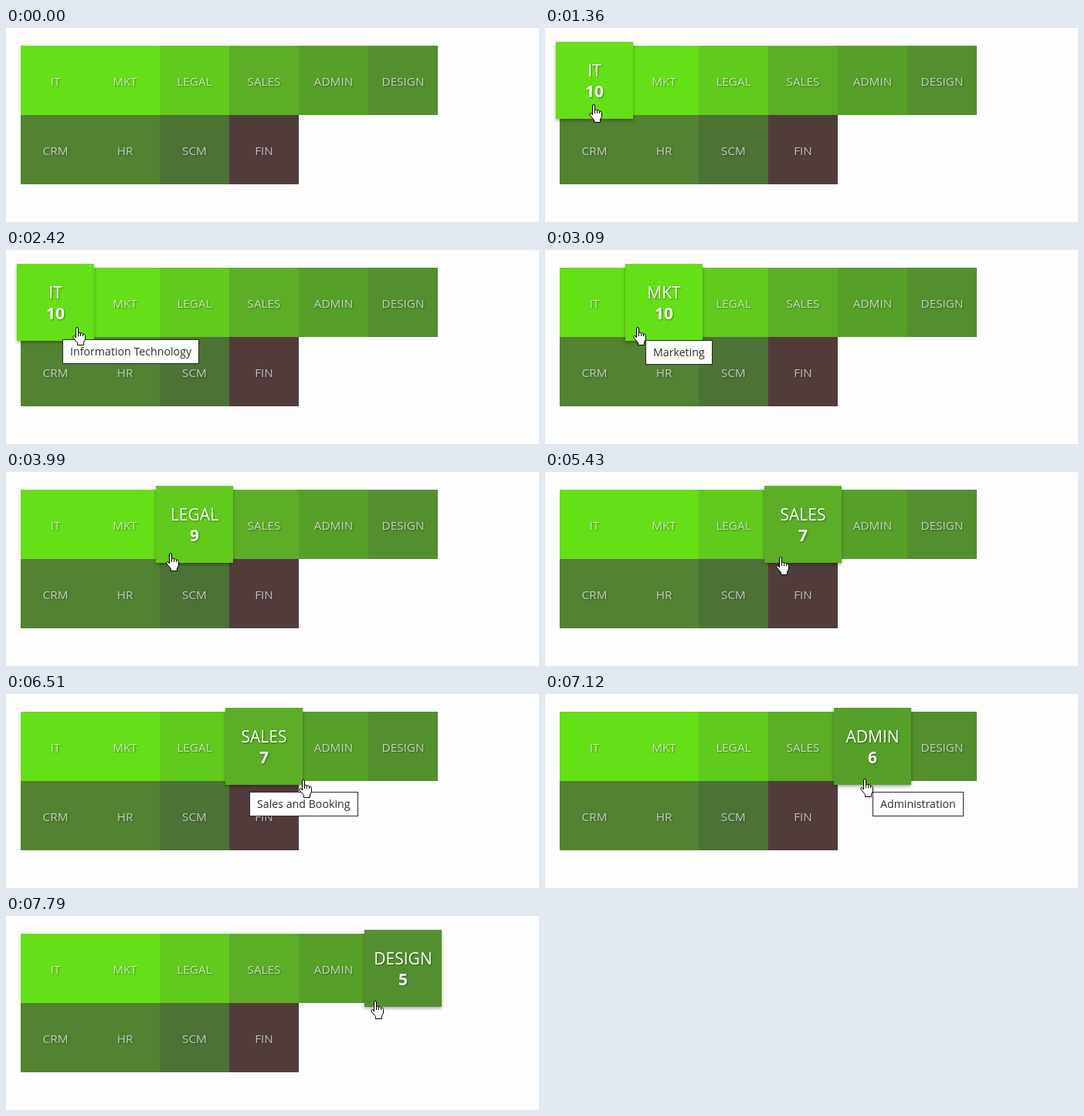
These frames come from a looping animation (690x252 px, 8 s). An HTML page:

```html
<!DOCTYPE html>
<html lang="en">
<head>
<meta charset="utf-8">
<title>Department tiles</title>
<style>
  html, body { margin: 0; width: 100%; height: 100%; overflow: hidden; }
  body { position: relative; background: linear-gradient(#fff 8px, #fdfdfd 8px); font-family: "Open Sans", "Noto Sans", sans-serif; }
  .tile { position: absolute; box-sizing: border-box; width: 90px; height: 90px; padding-top: 1px;
    font-size: 15.3px; line-height: 90px; text-align: center; white-space: nowrap;
    color: rgba(255, 255, 255, .7); text-shadow: 1px 1px 2px rgba(0, 0, 0, .4); }
  .tile b { display: none; }
  .tile.hover { width: 100px; height: 100px; margin: -5px; padding-top: 24px; z-index: 1;
    font-size: 21px; line-height: 27px; color: #fff; box-shadow: 0 2px 4px rgba(0, 0, 0, .35); }
  .tile.hover b { display: block; }
  #tip { position: absolute; z-index: 2; padding: 0 9px; border: 1px solid #2b2b2b; background: #fff;
    color: #2b2b2b; font-size: 14.2px; line-height: 30px; white-space: nowrap; }
  svg { position: absolute; left: 0; top: 0; z-index: 3; overflow: visible; fill: #fff; stroke: #000; }
</style>
</head>
<body>
<div id="tip"></div>
<svg id="cursor" width="18" height="24">
  <path id="arrow" d="M.5 .5V16.5L4.3 13L7 18.5L9.3 17.5L6.8 12.3H12Z"/>
  <path id="hand" transform="translate(-6 0)" d="M4.5 14V2Q4.5 .5 6 .5T7.5 2V7.5Q9 6.5 10.5 8Q12.5 7.2 13.5 9Q16.5 8.8 16.5 11.5V16L14.5 20V23.5H6.5V20.5L1 14Q.3 12 1.8 11.5Q3 11.3 4.5 14ZM7.5 7.5V12M10.5 8V12M13.5 9V12"/>
</svg>
<script>
const LOOP = 8000;

// label, colour, count, tooltip, tooltip time
const departments = [
  ['IT', '#65df17', 10, 'Information Technology', 1820],
  ['MKT', '#65df17', 10, 'Marketing', 3090],
  ['LEGAL', '#60cb1d', 9, 'Legal and Company Affairs', 4410],
  ['SALES', '#5bae26', 7, 'Sales and Booking', 5830],
  ['ADMIN', '#569f29', 6, 'Administration', 7120],
  ['DESIGN', '#538f2e', 5],
  ['CRM', '#528232', 4],
  ['HR', '#528232', 4],
  ['SCM', '#4c7236', 3],
  ['FIN', '#513c3b', 1]
];

// first step, last step, step count, target x, target y
const moves = [
  [740, 1020, 5, 1, 103],
  [1220, 1360, 3, 63, 99],
  [2350, 2560, 4, 120, 100],
  [3160, 3850, 10, 207, 105],
  [3920, 3990, 2, 213, 105],
  [4730, 5430, 11, 305, 110],
  [6160, 6510, 6, 385, 111],
  [6580, 6720, 3, 414, 110],
  [7450, 7790, 5, 478, 110]
];

const [tip, cursor, arrow, hand] = ['tip', 'cursor', 'arrow', 'hand'].map(id => document.getElementById(id));

const tiles = departments.map(([label, colour, count], i) => {
  const tile = document.createElement('div');
  tile.className = 'tile';
  tile.innerHTML = `${label}<b>${count}</b>`;
  tile.style.cssText = `left:${19 + i % 6 * 90}px; top:${23 + Math.floor(i / 6) * 90}px; background:${colour}`;
  document.body.append(tile);
  return tile;
});

function pointerAt(t) {
  let x = -15, y = 148;
  for (const [start, end, steps, toX, toY] of moves) {
    if (t < start) break;
    const step = Math.floor((t - start) / (end - start) * (steps - 1) + 1e-6) + 1;
    const part = Math.min(1, step / steps);
    x += (toX - x) * part;
    y += (toY - y) * part;
  }
  return [Math.round(x), Math.round(y)];
}

// The enlarged tile keeps the pointer until its own right edge.
const tileUnder = x => x < 19 ? -1 : Math.max(0, Math.ceil((x - 25) / 90) - 1);

const moveTo = (el, x, y) => el.style.transform = `translate(${x}px, ${y}px)`;

function draw(now) {
  const t = now % LOOP;
  const [x, y] = pointerAt(t);
  const active = tileUnder(x);
  tiles.forEach((tile, i) => tile.classList.toggle('hover', i === active));

  moveTo(cursor, x, y);
  arrow.style.display = active < 0 ? '' : 'none';
  hand.style.display = active < 0 ? 'none' : '';

  const [, , , text, tipTime] = departments[active] || [];
  const showTip = t >= tipTime;
  tip.style.display = showTip ? '' : 'none';
  if (showTip) {
    const [tipX, tipY] = pointerAt(tipTime);
    tip.textContent = text;
    tip.style.left = tipX + 10 + 'px';
    tip.style.top = tipY + 17 + 'px';
  }
}

const began = performance.now();
function frame() {
  draw(performance.now() - began);
  requestAnimationFrame(frame);
}
frame();
</script>
</body>
</html>
```
